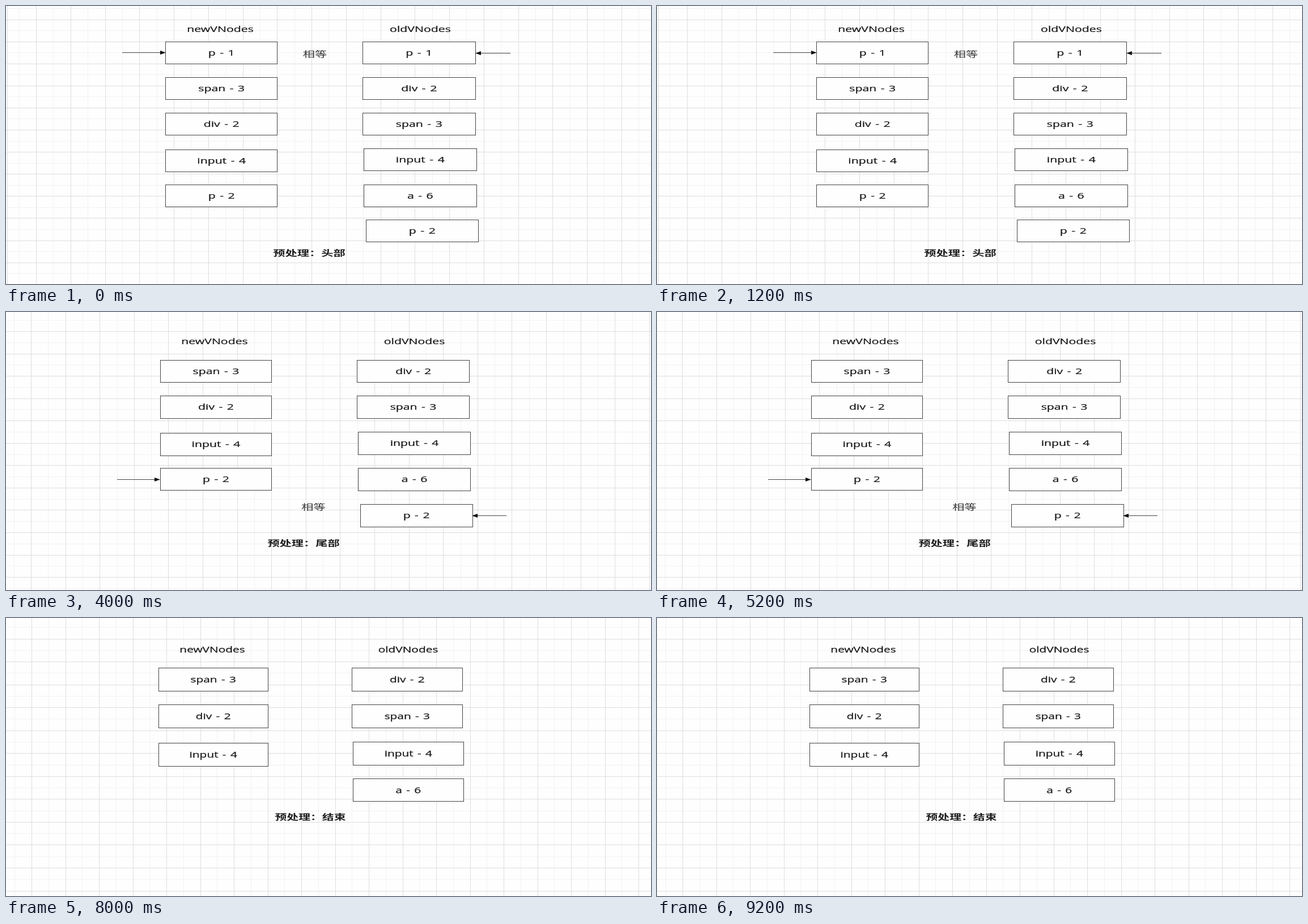
Recreate the animation shown at these times as an HTML page. Size 1138 px wide and 492 px high, loop 10000 ms.

```html
<!DOCTYPE html>
<html lang="zh-CN">
<head>
<meta charset="utf-8">
<title>VNode diff</title>
<style>
  html, body { margin: 0; width: 100%; height: 100%; overflow: hidden; background: #fefefe; }
  svg { display: block; width: 1138px; height: 492px; }
  text { font: 14px "Open Sans", "Noto Sans CJK SC", "Noto Sans CJK", sans-serif; fill: #1c1c1c; stroke: #1c1c1c; stroke-width: 0.25; text-anchor: middle; word-spacing: 1.3px; }
  .status { fill: #333; stroke: none; }
  .caption { font-weight: 700; stroke: none; }
  .box { fill: #fefefe; stroke: #444; }
  .arrow { stroke: #444; }
  .head { fill: #111; }
  .minor { stroke: #f2f2f2; }
  .major { stroke: #dedede; }
</style>
</head>
<body>
<svg id="stage" viewBox="0 0 1138 492"></svg>
<script>
const W = 1138, H = 492, HOLD = 2000;
const stage = document.getElementById('stage');

const NEW = { width: 3.25, names: ['p - 1', 'span - 3', 'div - 2', 'input - 4', 'p - 2'], shift: {} };
const OLD = {
  width: 3.27,
  names: ['p - 1', 'div - 2', 'span - 3', 'input - 4', 'a - 6', 'p - 2'],
  shift: { 'input - 4': 2, 'a - 6': 2, 'p - 2': 5.5 }
};

// grid: first line x, y and cell width, height; left/right: column x and row tops
const scenes = [
  { grid: [53.5, 24, 60.75, 39.1], edge: 2.5, skip: 0,
    left: [281.5, 63.5, 126, 189.5, 254.5, 316],
    right: [629.5, 63.5, 126, 189.5, 252.5, 316, 378.5],
    titles: [378, 731, 41.5],
    arrows: [[205, 282, 82.5], [890, 828, 83.5]],
    status: ['相等', 545, 85.5], caption: ['预处理：头部', 535, 437.5] },
  { grid: [46.5, 39.3, 60.9, 42.1], skip: 1,
    left: [275.5, 93, 160.5, 231, 296],
    right: [625, 93, 160.5, 229, 296, 364],
    titles: [372.5, 726.5, 58.5],
    arrows: [[199, 276, 113.5], [885, 824, 113.5]],
    status: ['不相等', 540, 113], caption: ['预处理：头部', 530.5, 438] },
  { grid: [44.5, 34.5, 60.6, 39.55], skip: 1,
    left: [272, 85, 148.5, 214.5, 276],
    right: [619.5, 85, 148.5, 212.5, 276.5, 340.5],
    titles: [368, 720.5, 52.5],
    arrows: [[196, 272, 296.5], [883, 822, 360.5]],
    status: ['相等', 542.5, 345], caption: ['预处理：尾部', 525, 409.5] },
  { grid: [49.7, 36.5, 59.95, 41], skip: 1,
    left: [274.5, 88.5, 154.5, 223.5],
    right: [618, 88.5, 154.5, 221, 287],
    titles: [370, 718.5, 55.5],
    arrows: [[199, 275, 243.5], [877, 817, 308.5]],
    status: ['不相等', 542, 281.5], caption: ['预处理：尾部', 542, 345] },
  { grid: [45.5, 37, 59.5, 40.55], skip: 1,
    left: [269, 88.5, 153.5, 221.5],
    right: [610.5, 88.5, 153.5, 219.5, 284],
    titles: [364, 709.5, 55.5],
    arrows: [], caption: ['预处理：结束', 537, 352] }
];

const snap = v => Math.floor(v) + 0.5;

function add(parent, tag, attrs) {
  const el = document.createElementNS('http://www.w3.org/2000/svg', tag);
  for (const key in attrs) el.setAttribute(key, attrs[key]);
  return parent.appendChild(el);
}

function drawGrid(g, [x0, y0, cw, ch], edge) {
  const lines = (dx, dy) => {
    let d = '';
    for (let x = x0 + dx - cw; x < W; x += cw) d += `M${snap(x)} 0V${H}`;
    for (let y = y0 + dy - ch; y < H; y += ch) d += `M0 ${snap(y)}H${W}`;
    return d;
  };
  add(g, 'path', { class: 'minor', d: lines(cw / 2, ch / 2) });
  add(g, 'path', { class: 'major', d: lines(0, 0) + (edge ? `M${edge} 0V${H}` : '') });
}

function drawArrow(g, [from, tip, y]) {
  const back = tip - 10 * Math.sign(tip - from);
  add(g, 'path', { class: 'arrow', d: `M${from} ${y}H${back}` });
  add(g, 'path', { class: 'head', d: `M${tip} ${y}L${back} ${y - 3.5}V${y + 3.5}Z` });
}

function build(s) {
  const g = add(stage, 'g', { display: 'none' });
  const [, , cw, ch] = s.grid;

  // text shares the diagram's zoom: one grid cell is 40 units
  const label = (str, x, y, cls = '') => {
    const transform = `translate(${x} ${y}) scale(${cw / 40} ${ch / 40})`;
    add(g, 'text', { class: cls, y: 5, transform }).textContent = str;
  };
  const column = ([x, ...tops], { width, names, shift }) => tops.forEach((top, i) => {
    const name = names[i + s.skip];
    const left = x + (shift[name] || 0);
    const w = cw * width, h = ch * 1.01;
    const bx = snap(left), by = snap(top);
    add(g, 'rect', { class: 'box', x: bx, y: by, width: snap(left + w) - bx, height: snap(top + h) - by });
    label(name, left + w / 2, top + h / 2);
  });

  drawGrid(g, s.grid, s.edge);
  column(s.left, NEW);
  column(s.right, OLD);
  const [nx, ox, ty] = s.titles;
  label('newVNodes', nx, ty);
  label('oldVNodes', ox, ty);
  s.arrows.forEach(a => drawArrow(g, a));
  if (s.status) label(...s.status, 'status');
  label(...s.caption, 'caption');
  return g;
}

const groups = scenes.map(build);

function render(ms) {
  const current = Math.floor(ms / HOLD) % groups.length;
  groups.forEach((g, i) => g.setAttribute('display', i === current ? 'inline' : 'none'));
}

const start = performance.now();
function tick() {
  render(performance.now() - start);
  requestAnimationFrame(tick);
}
tick();
</script>
</body>
</html>
```
